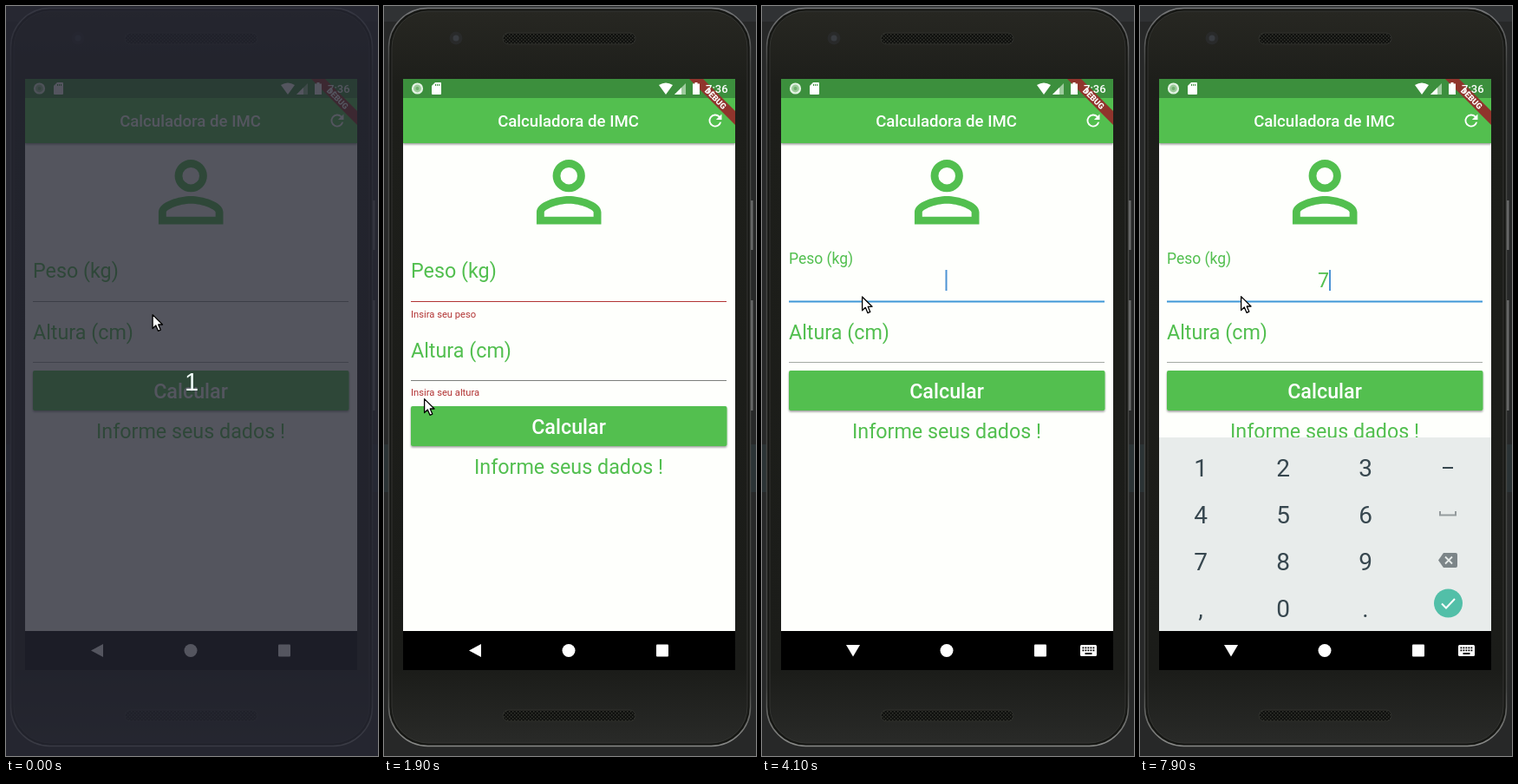
These frames come from a looping animation (429 px wide and 864 px high, 8000 ms). An HTML page:

```html
<!DOCTYPE html>
<html lang="pt">
<head>
<meta charset="utf-8">
<style>
html, body { margin: 0; height: 100%; overflow: hidden; background: #272828; }
svg { display: block; width: 100vw; height: 100vh; }
text { font-family: Roboto, sans-serif; }
.mid { text-anchor: middle; }
.bold { font-weight: 500; fill: #fff; }
.green { fill: #52bf4f; font-size: 23.3px; }
.error { fill: #b23434; font-size: 11.2px; }
.key { fill: #37474f; font-size: 28px; }
</style>
</head>
<body>
<svg viewBox="0 0 429 864">
  <defs>
    <linearGradient id="shell" x2="0" y2="1">
      <stop stop-color="#272722"/><stop offset=".1" stop-color="#1d1e1a"/>
      <stop offset=".9" stop-color="#1b1c19"/><stop offset="1" stop-color="#292a28"/>
    </linearGradient>
    <linearGradient id="rim" x2="0" y2="1">
      <stop stop-color="#77787a"/><stop offset=".08" stop-color="#454644"/>
      <stop offset=".92" stop-color="#454644"/><stop offset="1" stop-color="#8a8b89"/>
    </linearGradient>
    <pattern id="mesh" width="4" height="4" patternUnits="userSpaceOnUse">
      <path fill="#10110f" d="M0 0h4v4H0z"/><path fill="#34352f" d="M0 0h1.4v1.4H0zM2 2h1.4v1.4H2z"/>
    </pattern>
    <filter id="shadow" x="-10%" y="-20%" width="120%" height="150%">
      <feDropShadow dx="0" dy="1.5" stdDeviation="1.2" flood-opacity=".4"/>
    </filter>
    <clipPath id="screen"><path d="M22 84h383v681H22z"/></clipPath>
    <clipPath id="content"><path d="M22 84h383v636H22z"/></clipPath>
  </defs>

  <path fill="#272828" d="M0 0h429v864H0z"/>
  <path fill="#303234" d="M0 0h429v18H0z"/>
  <path fill="#2b3335" d="M0 505h429v55H0z"/>
  <path fill="#6a6b6b" d="M422 224h3.500v57h-3.500zM422 339h3.500v127h-3.500z"/>
  <rect x="5.500" y="2.500" width="417" height="850" rx="45" fill="#161714" stroke="url(#rim)" stroke-width="1.500"/>
  <rect x="9" y="6" width="410" height="843" rx="42" fill="url(#shell)" stroke="#343532"/>
  <circle cx="83" cy="37" r="7.500" fill="#292a2a"/><circle cx="83" cy="37" r="3.500" fill="#383b40"/>
  <rect x="137" y="31" width="153" height="13" rx="6.500" fill="url(#mesh)" stroke="#30312d"/>
  <rect x="137" y="811" width="153" height="13" rx="6.500" fill="url(#mesh)" stroke="#30312d"/>

  <g clip-path="url(#screen)">
    <path fill="#fefffc" d="M22 84h383v636H22z"/>
    <g filter="url(#shadow)"><path fill="#52bf4f" d="M22 106h383v52H22z"/></g>
    <path fill="#3c8f3d" d="M22 84h383v22H22z"/>
    <text class="mid bold" x="212.500" y="139" font-size="18.600">Calculadora de IMC</text>
    <path fill="#fff" transform="translate(370.800 120.800) scale(.932)" d="M17.650 6.350A8 8 0 1 0 19.730 14h-2.080A6 6 0 1 1 16.220 7.780L13 11h7V4z"/>
    <circle id="ripple" cx="382" cy="132" r="24" fill="#fff"/>
    <path fill="#52bf4f" fill-rule="evenodd" transform="translate(157.300 158.400) scale(4.660)" d="M12 4a4 4 0 1 0 0 8a4 4 0 1 0 0-8zm0 1.900a2.100 2.100 0 1 1 0 4.200a2.100 2.100 0 1 1 0-4.200zM12 13c-2.670 0-8 1.340-8 4v3h16v-3c0-2.660-5.330-4-8-4zm0 1.900c2.970 0 6.100 1.460 6.100 2.100v1.100H5.900V17c0-.640 3.130-2.100 6.100-2.100z"/>

    <text class="green" id="weightLabel" x="31">Peso (kg)</text>
    <path id="weightLine" d="M31 340.500h364"/>
    <text class="green mid" id="digit" x="211.500" y="324">7</text>
    <path id="caret" fill="#4d93d4" d="M0 304h2v24h-2z"/>
    <text class="error" id="weightError" x="31" y="358.500">Insira seu peso</text>
    <g id="heightField">
      <text class="green" x="31" y="383.500">Altura (cm)</text>
      <path id="heightLine" d="M31 410.500h364"/>
    </g>
    <text class="error" id="heightError" x="31" y="449">Insira seu altura</text>
    <g id="lower">
      <rect x="31" y="420" width="364.500" height="46" rx="2" fill="#52bf4f" filter="url(#shadow)"/>
      <text class="mid bold" x="213" y="451.500" font-size="23.300">Calcular</text>
      <text class="green mid" x="213" y="498">Informe seus dados !</text>
    </g>

    <path fill="#90342c" d="M352 84h16l37 37v16z"/>
    <text class="mid" transform="translate(382.500 106.500) rotate(45)" y="3.400" font-size="9.500" font-weight="900" fill="#fff">DEBUG</text>

    <circle cx="38.500" cy="95" r="5.500" fill="#9ccb9a" stroke="#e4f2e4" stroke-width="2.200"/>
    <circle cx="38.500" cy="95" r="2" fill="#6faf6e"/>
    <path fill="#fff" d="M59 88h6q1 0 1 1v12q0 1-1 1h-9q-1 0-1-1v-9zM317 91q8-5 16 0l-8 11zM356 89.500h2.500V88h3v1.500h2.500V102h-8z"/>
    <path fill="#3c8f3d" d="M59 90h1v2h-1zM61 90h1v2h-1zM63 90h1v2h-1z"/>
    <path fill="#9dcb9d" d="M348 89v13h-13z"/><path fill="#fff" d="M343 94v8h-8z"/>
    <text class="bold" x="371" y="99.500" font-size="13">7:36</text>

    <g clip-path="url(#content)"><g id="keyboard">
      <path fill="#e8eceb" d="M22 497h383v223H22z"/>
      <g id="keys"></g>
      <path fill="#37474f" d="M349 531h12v2h-12z"/>
      <path fill="none" stroke="#949b9d" stroke-width="2" d="M346 582v4.500h18V582"/>
      <path fill="#7c8588" d="M350 630h14q2 0 2 2v13q0 2-2 2h-14l-6-8.500z"/>
      <path stroke="#e8eceb" stroke-width="1.800" d="M352 634.500l8 8m0-8l-8 8"/>
      <circle cx="355.500" cy="688" r="16.500" fill="#52bfa8"/>
      <path fill="none" stroke="#fff" stroke-width="2" d="M348 688.500l5 5l10-10.500"/>
    </g></g>

    <path d="M22 720h383v45H22z"/>
    <g fill="#fff">
      <path id="back"/>
      <circle cx="213" cy="742.500" r="7.500"/>
      <rect x="314" y="735.500" width="14" height="14" rx="1"/>
      <g id="switcher">
        <rect x="367" y="736" width="19" height="13" rx="1.500"/>
        <path stroke="#000" stroke-width="1.800" stroke-dasharray="1.800 1.200" d="M369.500 739.300h14.500M369.500 742.300h14.500"/>
        <path stroke="#000" stroke-width="1.800" d="M372.500 746h8"/>
      </g>
    </g>
  </g>

  <g id="countdown">
    <path fill="#242632" fill-opacity=".78" d="M0 0h429v864H0z"/>
    <text class="mid" x="214" y="443" fill="#f2fffb" style="font:29px 'Liberation Sans',sans-serif">1</text>
  </g>
  <path id="pointer" fill="#fff" stroke="#000" stroke-width="1.300" stroke-linejoin="round" d="M.600.600V16.500L4.300 13L7 19.300L9.800 18.100L7.200 12H12z"/>
</svg>

<script>
const $ = id => document.getElementById(id);
const set = (id, attrs) => { for (const k in attrs) $(id).setAttribute(k, attrs[k]); };
const fade = (id, value) => set(id, { opacity: +value });
const move = (id, x, y) => set(id, { transform: `translate(${x} ${y})` });
const within = (t, a, b) => t >= a && t < b;
const ramp = (t, a, b) => Math.min(1, Math.max(0, (t - a) / (b - a)));
const line = (id, color, width) => set(id, { stroke: color, 'stroke-width': width });

// time, x, y of the mouse pointer
const path = [
  [400, 168.5, 355], [1000, 205, 432], [1600, 205, 432], [1800, 110, 458], [1900, 46, 452],
  [2100, 60, 355], [2300, 230, 320], [2500, 389, 252], [2700, 361, 147], [2900, 375, 126],
  [3300, 375, 126], [3800, 115, 334.5], [4700, 115, 334], [4900, 116, 334]
];

function pointerAt(t) {
  const i = path.findIndex(p => p[0] > t);
  if (i < 0) return path[path.length - 1].slice(1);
  if (!i) return path[0].slice(1);
  const a = path[i - 1], b = path[i], k = ramp(t, a[0], b[0]);
  return [1, 2].map(n => a[n] + (b[n] - a[n]) * k);
}

['123', '456', '789', ',0.'].forEach((row, r) => [...row].forEach((char, c) => {
  $('keys').insertAdjacentHTML('beforeend',
    `<text class="key mid" x="${70 + c * 95}" y="${542 + r * 54}">${char}</text>`);
}));

function draw(t) {
  fade('countdown', t < 400);
  move('pointer', ...pointerAt(t));

  // validation errors push the form down
  const invalid = within(t, 1100, 3100);
  const error = invalid ? ramp(t, 1200, 1400) : 0;
  fade('weightError', error);
  fade('heightError', error);
  move('heightField', 0, invalid ? 21 : 0);
  move('lower', 0, invalid ? 41 : 0);
  fade('ripple', within(t, 2900, 3200) ? .15 : 0);

  const focus = ramp(t, 3800, 4100);
  set('weightLabel', { y: 313 - 16 * focus, 'font-size': 23.3, style: `font-size:${23.3 - 5.8 * focus}px` });
  if (focus) line('weightLine', '#3f97d8', 2);
  else line('weightLine', error ? '#b23434' : '#909590', 1.1);
  line('heightLine', error ? '#7c7f7c' : '#a4a9a4', 1.1);

  const typed = within(t, 5500, 6800) || t >= 7800;
  fade('digit', typed);
  move('caret', typed ? 218 : 211.5, 0);
  fade('caret', within(t, 4000, 4300) || within(t, 4800, 6100) || within(t, 6800, 7300) || t >= 7800);

  const open = t >= 4100;
  set('back', { d: open ? 'M97 736h16l-8 13.500z' : 'M112 735v15l-14-7.500z' });
  fade('switcher', open);
  const slide = 1 - ramp(t, 4200, 4500);
  move('keyboard', 0, 223 * slide * slide);
  fade('keyboard', t >= 4300);
}

const start = performance.now();
function tick() {
  const t = (performance.now() - start) % 8000;
  draw(Math.floor(t / 100) * 100);
  requestAnimationFrame(tick);
}
tick();
</script>
</body>
</html>
```
